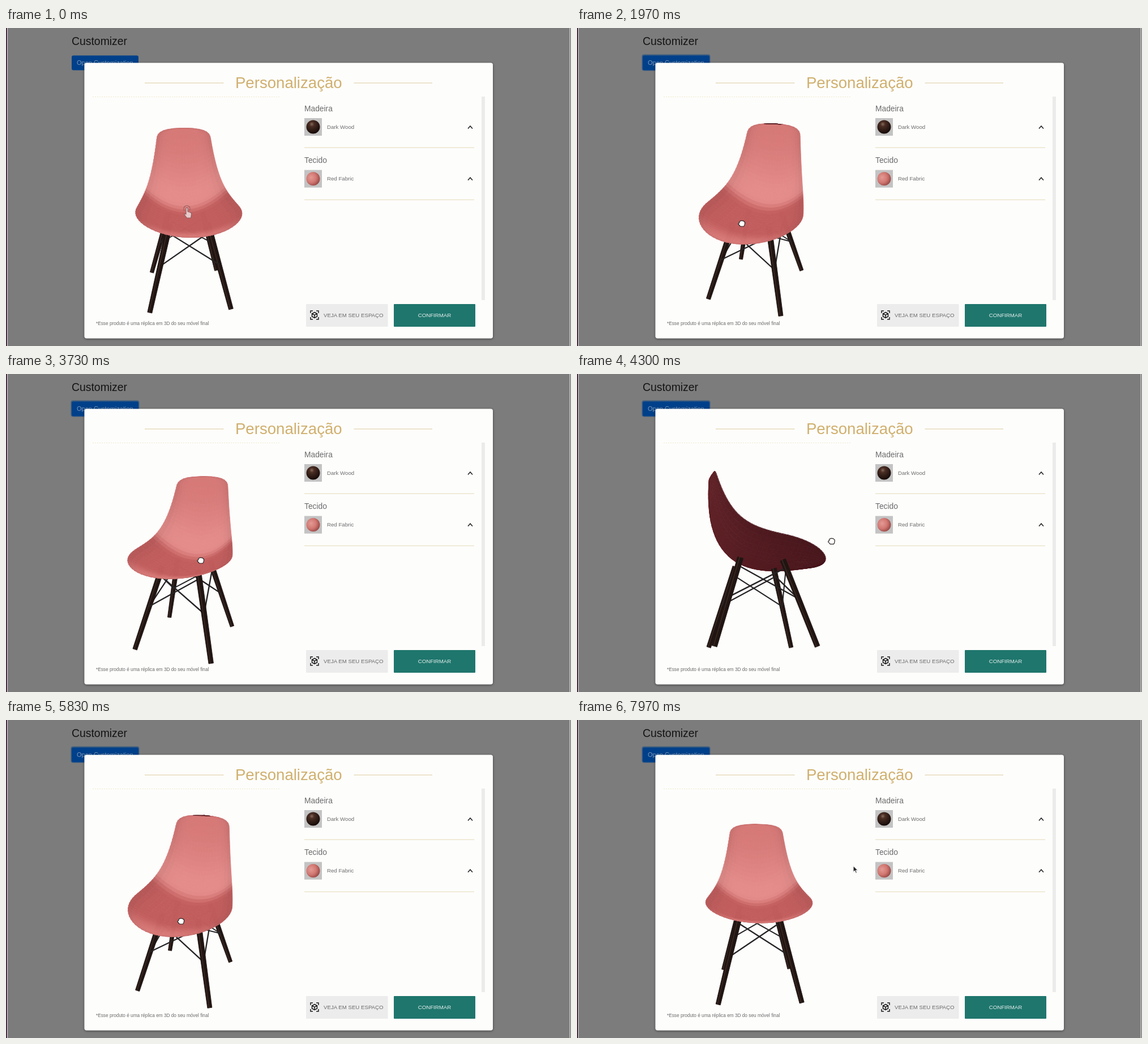
Write an HTML page with a canvas that moves like this. It is 998 px wide and 561 px high and loops after 8 s.

```html
<!DOCTYPE html>
<html lang="pt">
<head>
<meta charset="utf-8">
<title>Customizer</title>
<style>
  html, body { margin: 0; width: 100%; height: 100%; overflow: hidden; background: #7c7c7c; }
  svg, canvas { position: absolute; left: 0; top: 0; width: 998px; height: 561px; }
  text { font-family: "Liberation Sans", Arial, sans-serif; fill: #6b6b6b; }
  .title { font-size: 13.8px; }
  .label { font-size: 9.66px; }
</style>
</head>
<body>
<svg viewBox="0 0 998 561">
  <defs>
    <radialGradient id="wood" cx=".4" cy=".3" r=".7">
      <stop offset="0" stop-color="#8a6a5c"/><stop offset=".25" stop-color="#4a2e24"/><stop offset="1" stop-color="#160b08"/>
    </radialGradient>
    <radialGradient id="fabric" cx=".35" cy=".4" r=".75">
      <stop offset="0" stop-color="#e39a95"/><stop offset=".5" stop-color="#d27872"/><stop offset="1" stop-color="#8a3c3c"/>
    </radialGradient>
    <filter id="shadow" x="-5%" y="-5%" width="110%" height="110%">
      <feDropShadow dx="0" dy="1" stdDeviation="2" flood-opacity=".5"/>
    </filter>
  </defs>
  <rect width="998" height="561" fill="#7c7c7c"/>
  <path d="M1 0V561" stroke="#452a3d" stroke-width="2"/>
  <path d="M2.5 0V561M996 0V561" stroke="#e6e3e5"/>
  <text x="116" y="30" style="font-size:19.4px;fill:#141414">Customizer</text>
  <rect id="ring" x="114.500" y="46.500" width="121" height="29" rx="4" fill="#405e80"/>
  <rect x="116" y="48.500" width="118" height="26" rx="3" fill="#00408a"/>
  <text x="125" y="65" style="font-size:11px;fill:#7f98b8">Open Customization</text>

  <rect x="138.500" y="61.500" width="721.500" height="486" rx="4" fill="#fdfdfc" filter="url(#shadow)"/>
  <path d="M245 97H384.500M614.500 97H753" stroke="#d9c998"/>
  <text x="499.300" y="106" text-anchor="middle" style="font-size:27.6px;fill:#d0b06e">Personalização</text>
  <path d="M153 121.500H484" stroke="#efe9c6" stroke-dasharray="2 2"/>
  <rect x="840" y="121" width="6" height="359" fill="#ebebeb"/>

  <text class="title" x="527" y="147">Madeira</text>
  <rect x="527" y="159" width="31" height="31" fill="#c3c3c3"/>
  <circle cx="542.500" cy="174.500" r="12" fill="url(#wood)"/>
  <text class="label" x="567" y="178">Dark Wood</text>
  <text class="title" x="527" y="238">Tecido</text>
  <rect x="527" y="250.500" width="31" height="31" fill="#c3c3c3"/>
  <circle cx="542.500" cy="266" r="12" fill="url(#fabric)"/>
  <text class="label" x="567" y="269">Red Fabric</text>
  <path d="M816 177.500l4-4.500 4 4.500M816 268.500l4-4.500 4 4.500" fill="none" stroke="#222" stroke-width="1.500"/>
  <path d="M527 211H827M527 303H827" stroke="#e2dab4"/>

  <rect x="530" y="487" width="144.500" height="40" rx="1" fill="#ececec"/>
  <g fill="none" stroke="#1c1c1c" stroke-width="1.500">
    <path d="M538 503v-4h4M548 499h4v4M552 510v4h-4M542 514h-4v-4"/>
    <path d="M545 501.500l4.500 2.500v5l-4.500 2.500-4.500-2.500v-5zM540.500 504l4.500 2.500 4.500-2.500M545 506.500v5"/>
  </g>
  <text class="label" x="561" y="510">VEJA EM SEU ESPAÇO</text>
  <rect x="685" y="487" width="144" height="40" rx="1" fill="#1f766d"/>
  <text class="label" x="757" y="510" text-anchor="middle" style="fill:#e6f0ee">CONFIRMAR</text>
  <text x="159" y="524" style="font-size:8.28px">*Esse produto é uma réplica em 3D do seu móvel final</text>
</svg>
<canvas id="stage" width="998" height="561"></canvas>
<script>
const ctx = document.getElementById('stage').getContext('2d');
const ring = document.getElementById('ring');
const LOOP = 8000, GRAB_START = 850;

const clamp = v => Math.min(1, Math.max(0, v));
const smooth = (from, to, v) => {
  const u = clamp((v - from) / (to - from));
  return u * u * (3 - 2 * u);
};
const mix = (a, b, u) => a.map((v, i) => v + (b[i] - v) * u);
const rgb = c => `rgb(${c.map(Math.round)})`;
const bezier = (a, b, c, d, u) => {
  const ab = mix(a, b, u), bc = mix(b, c, u), cd = mix(c, d, u);
  return mix(mix(ab, bc, u), mix(bc, cd, u), u);
};

// Turning points of the drag: time, [yaw, pitch, pointer x, pointer y]
const turns = [
  [0, [4.5, 14, 340, 300]],
  [900, [0, 14, 335, 305]],
  [1970, [-20, 20.5, 291, 345]],
  [2850, [-22, 48, 305, 395]],
  [3730, [-20, 11, 344, 329]],
  [4650, [159, -29.7, 500, 279]],
  [5830, [-20, 21, 309, 355]],
  [6770, [-6, 61, 346, 399]],
  [7500, [2, 14, 338, 345]],
  [7950, [2.5, 9, 488, 257]]
];

function pose(t) {
  const next = turns.findIndex(([time]) => time > t);
  if (next < 0) return turns.at(-1)[1];
  const [start, a] = turns[next - 1], [end, b] = turns[next];
  return mix(a, b, smooth(start, end, t));
}

// The shell runs from the front lip (u = 0) to the top of the back (u = 1); curve points are [z, y].
const spine = u => bezier([28.8, -5], [1, -11], [-24, -14], [-22.8, 32.2], u);
const rim = u => bezier([29.5, -5], [-3, 4], [-12, -2], [-21.5, 32.2], u);
const halfWidth = u => {
  const lip = Math.sqrt(1 - clamp(1 - u / 0.3) ** 2);
  const corner = Math.cbrt(1 - clamp((u - 0.95) / 0.05) ** 3);
  return (25.6 - 13.3 * u) * lip * corner;
};
const fabric = u => {
  const seat = mix([216, 122, 120], [194, 93, 93], smooth(0, 0.2, u));
  const back = mix([228, 140, 138], [214, 121, 119], smooth(0.65, 1, u));
  return mix(seat, back, smooth(0.46, 0.6, u));
};

const ROWS = 48, COLS = 20;
const along = r => (1 - Math.cos(Math.PI * r / ROWS)) / 2;
const across = c => c / COLS * 2 - 1;
const mesh = Array.from({ length: ROWS + 1 }, (_, r) => {
  const u = along(r);
  return Array.from({ length: COLS + 1 }, (_, c) => {
    const s = across(c), [z, y] = mix(spine(u), rim(u), s * s);
    return [halfWidth(u) * s, y, z];
  });
});

const legs = [[-1, 1], [1, 1], [1, -1], [-1, -1]].map(([x, z]) =>
  ({ top: [8 * x, -6, 9 * z], foot: [17 * x, -41, 19 * z] }));
const wires = legs.flatMap((leg, i) => [1, 3].map(step => {
  const next = legs[(i + step) % 4];
  return [mix(leg.top, leg.foot, 0.48), mix(next.top, next.foot, 0.1)];
}));

function camera(yaw, pitch) {
  const rad = Math.PI / 180;
  const sy = Math.sin(yaw * rad), cy = Math.cos(yaw * rad);
  const sp = Math.sin(pitch * rad), cp = Math.cos(pitch * rad);
  return ([x, y, z]) => {
    const right = x * cy + z * sy, ahead = z * cy - x * sy;
    const depth = ahead * cp + y * sp, scale = 600 / (150 - depth);
    return [320 + right * scale, 311 - (y * cp - ahead * sp) * scale, depth, scale];
  };
}

function polygon(points, color) {
  ctx.beginPath();
  points.forEach(p => ctx.lineTo(p[0], p[1]));
  ctx.closePath();
  ctx.fillStyle = ctx.strokeStyle = color;
  ctx.lineWidth = 0.8;
  ctx.fill();
  ctx.stroke();
}

function line(a, b, width, color) {
  ctx.beginPath();
  ctx.moveTo(a[0], a[1]);
  ctx.lineTo(b[0], b[1]);
  ctx.lineWidth = width;
  ctx.strokeStyle = color;
  ctx.stroke();
}

function drawLeg(a, b) {
  const length = Math.hypot(b[0] - a[0], b[1] - a[1]) || 1;
  const nx = (a[1] - b[1]) / length, ny = (b[0] - a[0]) / length;
  const side = (p, r) => [p[0] + nx * r * p[3], p[1] + ny * r * p[3]];
  polygon([side(a, 1.2), side(b, 0.95), side(b, -0.95), side(a, -1.2)], '#201512');
  line(side(a, 0.35), side(b, 0.3), 1.8, 'rgba(92,66,54,.4)');
}

const drawWire = (a, b) => line(a, b, 0.55 * a[3], '#262324');

function drawBase(project) {
  const part = (from, to, draw) => {
    const a = project(from), b = project(to);
    return { depth: a[2] + b[2], draw: () => draw(a, b) };
  };
  [
    ...wires.map(([from, to]) => part(from, to, drawWire)),
    ...legs.map(leg => part(leg.top, leg.foot, drawLeg))
  ].sort((p, q) => p.depth - q.depth).forEach(p => p.draw());
}

function drawShell(project) {
  const grid = mesh.map(row => row.map(project)), quads = [];
  for (let r = 0; r < ROWS; r++) {
    const u = along(r + 0.5);
    const inside = fabric(u), outside = mix([72, 22, 28], [98, 35, 40], u);
    for (let c = 0; c < COLS; c++) {
      const points = [grid[r][c], grid[r][c + 1], grid[r + 1][c + 1], grid[r + 1][c]];
      const [p, q, s, t] = points;
      const area = (s[0] - p[0]) * (t[1] - q[1]) - (s[1] - p[1]) * (t[0] - q[0]);
      const shade = 1 - 0.08 * across(c + 0.5) ** 6;
      const color = rgb((area < 0 ? inside : outside).map(v => v * shade));
      quads.push({ points, color, depth: p[2] + q[2] + s[2] + t[2] });
    }
  }
  quads.sort((a, b) => a.depth - b.depth).forEach(q => polygon(q.points, q.color));
}

const grab = new Path2D('M-4-1Q-5-4-2.500-4.200-1-5.800 1-4.800 3-5.400 4-3.600 6-3.200 5.500 0 5 4 3.500 5H-2.500Q-4 3-6 1-6-1-4-1Z');
const arrow = new Path2D('M0 0V11.500L2.700 9 4.600 13.200 6.500 12.300 4.700 8.300H8.200Z');
const touch = new Path2D('M-2-7Q-.5-8.500 1-7V-1L6 .5Q8 1.500 7.500 4L6.500 10H-.5L-5 4Q-5 2-2 3.500Z');
const halo = new Path2D('M-5-3A5.500 5.500 0 1 1 4-3');

function drawIcon(path, x, y, fill, stroke) {
  ctx.save();
  ctx.translate(x, y);
  ctx.lineWidth = 1.2;
  ctx.fillStyle = fill;
  ctx.strokeStyle = stroke;
  if (path === touch) ctx.stroke(halo);
  ctx.fill(path);
  ctx.stroke(path);
  ctx.restore();
}

function drawPointer(t, x, y) {
  if (t < GRAB_START) {
    ctx.globalAlpha = 0.85 * clamp((GRAB_START - t) / 200);
    drawIcon(touch, 320, 325, '#f0dcdc', '#84595b');
    ctx.globalAlpha = 1;
  } else if (x > 484 && t > 7500) {
    drawIcon(arrow, x, y, '#222', '#eee');
  } else {
    drawIcon(grab, x, y, '#fff', '#2b2222');
  }
}

function frame(now) {
  const t = now % LOOP;
  const [yaw, pitch, x, y] = pose(t);
  const project = camera(yaw, pitch);
  ctx.clearRect(0, 0, 998, 561);
  ctx.lineJoin = ctx.lineCap = 'round';
  const layers = [drawBase, drawShell];
  if (pitch < -3) layers.reverse();
  layers.forEach(draw => draw(project));
  drawPointer(t, x, y);
  ring.style.visibility = t < GRAB_START ? 'hidden' : 'visible';
  requestAnimationFrame(frame);
}
requestAnimationFrame(frame);
</script>
</body>
</html>
```
